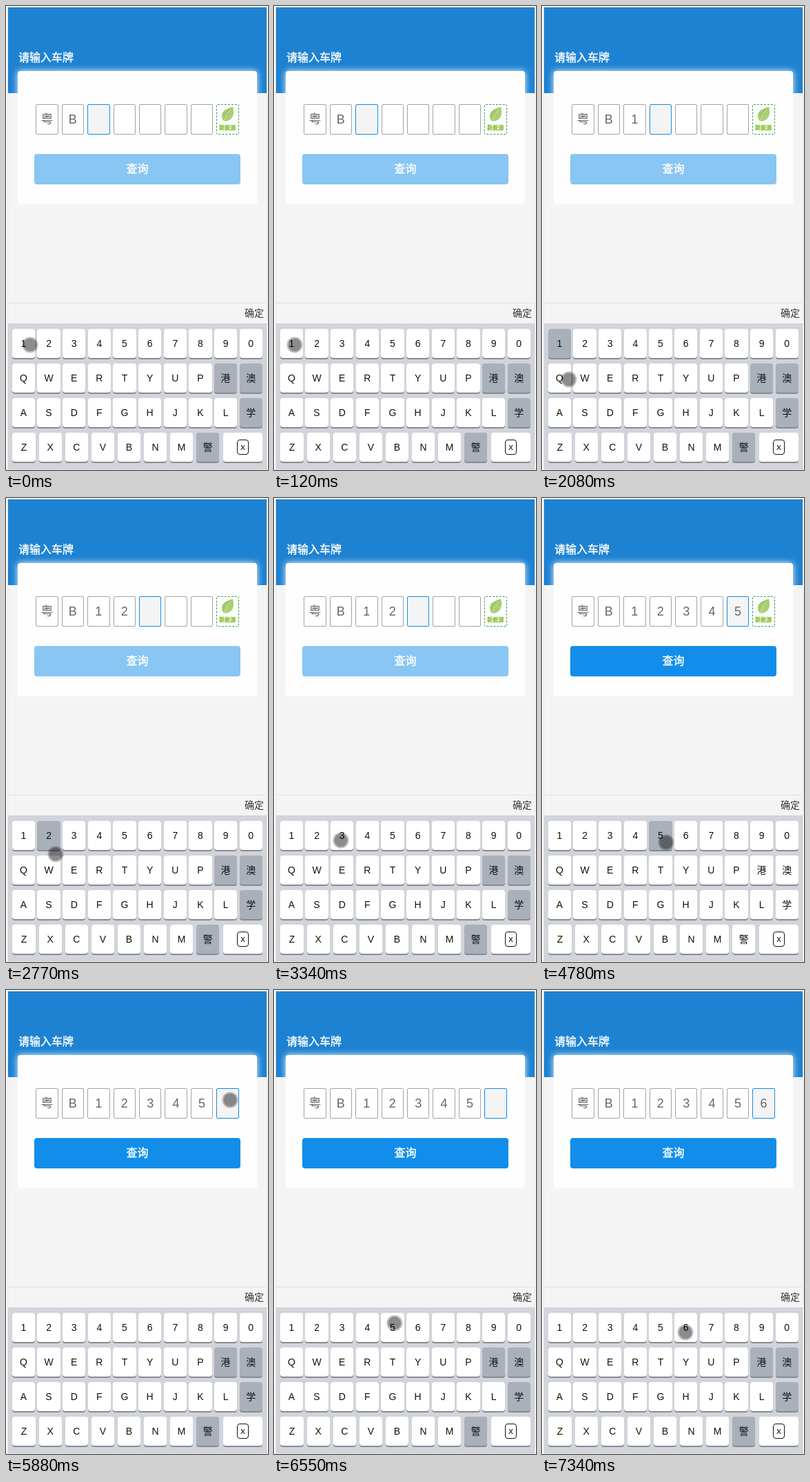
An HTML page that plays this animation: 380 px wide and 671 px high, repeating every 8000 ms.

```html
<!DOCTYPE html>
<html lang="zh-CN">
<head>
<meta charset="utf-8">
<title>请输入车牌</title>
<style>
html, body { margin: 0; width: 100%; height: 100%; overflow: hidden; background: #fff; }
body { font-family: "Liberation Sans", Arial, "Noto Sans CJK SC", "Noto Sans CJK", sans-serif; }
#stage { position: relative; width: 380px; height: 671px; overflow: hidden; }
#stage div, #stage svg { position: absolute; box-sizing: border-box; white-space: nowrap; }
.page { left: 2px; top: 1px; width: 377px; height: 670px; background: #f4f4f4; border: 1px solid #e3e3e3; }
.head { left: 3px; top: 2px; width: 375px; height: 124px; background: #1e82d2; }
.title, .go { font-size: 16px; font-weight: 500; color: #fff; -webkit-text-stroke: .4px #fff; }
.title { left: 18px; top: 63px; line-height: 24px; }
.card { left: 17px; top: 94px; width: 347px; height: 192px; border-radius: 4px; background: #fefefe; box-shadow: 0 0 10px #f4f9fd; }
.cell { top: 142px; width: 32.4px; height: 44px; line-height: 42px; border: 1px solid #a3a3a3; border-radius: 2px; text-align: center; font-size: 18px; color: #666; background: #fff; }
.cell.green { border: 1px dashed #36a04c; }
.cell.on { border: 1px solid #118de9; background: #f4f4f4; }
.go { left: 41px; top: 214px; width: 299px; height: 44px; line-height: 43px; border-radius: 4px; text-align: center; background: #89c6f3; }
.go.on { background: #128eea; }
.bar { left: 3px; top: 429px; width: 375px; height: 30px; padding-right: 4px; line-height: 29px; border-top: 1px solid #e4e4e4; text-align: right; font-size: 14px; color: #333; }
.board { left: 3px; top: 459px; width: 375px; height: 211px; background: #d1d4da; }
.key { height: 42px; line-height: 42px; border-radius: 4px; text-align: center; font-size: 14px; color: #111; background: #fff; box-shadow: 0 2px 0 #898b8f; }
.key.dim { background: #a9b0ba; box-shadow: 0 2px 0 #868b92; }
.del { left: 335px; top: 627px; width: 17px; height: 22px; line-height: 19px; border: 1px solid #111; border-radius: 4px; text-align: center; font-size: 13px; color: #111; }
#leaf { left: 305px; top: 142px; }
#dot { left: -11.5px; top: -11.5px; width: 23px; height: 23px; border: 2.5px solid rgba(0,0,0,.25); border-radius: 50%; background: rgba(0,0,0,.45); background-clip: padding-box; }
</style>
</head>
<body>
<div id="stage">
  <div class="page"></div>
  <div class="head"></div>
  <div class="card"></div>
  <div class="title">请输入车牌</div>
  <div class="go">查询</div>
  <div class="bar">确定</div>
  <div class="board"></div>
</div>
<script>
const stage = document.getElementById('stage');
const LOOP = 8000, STEP = 130, HOLD = 145;
const PLATE = '粤B123456', LOCKED = '港澳学警';
const PRESSES = [2080, 2770, 3460, 4040, 4780, 7190];
const LAST_CELL = 5880;

// pointer moves: start time, x, y, number of visible steps
const MOVES = [
  [0, 34.5, 489.5], [120, 29.5, 489.5],
  [2080, 38.5, 539.5], [2200, 56.5, 551.5], [2350, 62.5, 495.5, 3],
  [2770, 71.5, 514.5], [2920, 91.5, 540.5], [3040, 96.5, 494.5, 3],
  [3610, 144.5, 494.5, 4],
  [4200, 165.5, 509.5], [4350, 179.5, 497.5],
  [5210, 318.5, 287.5, 2], [5490, 324.5, 158.5, 2],
  [6040, 307.5, 355.5], [6190, 165.5, 489.5, 4], [6670, 207.5, 494.5, 3]
];

function pointer(t) {
  const i = MOVES.findLastIndex(m => m[0] <= t);
  const [start, x, y, steps = 1] = MOVES[i];
  const [, fromX, fromY] = MOVES[Math.max(0, i - 1)];
  const p = Math.min(1, (Math.floor((t - start) / STEP) + 1) / steps);
  const rest = (1 - p) ** 2;
  return [x + (fromX - x) * rest, y + (fromY - y) * rest];
}

function add(cls, text = '', css = {}) {
  const el = document.createElement('div');
  el.className = cls;
  el.textContent = text;
  Object.assign(el.style, css);
  return stage.appendChild(el);
}

const cells = Array.from(PLATE, (c, i) => add('cell', '', { left: 43.25 + i * 37.43 + 'px' }));

stage.insertAdjacentHTML('beforeend', `
<svg id="leaf" width="33" height="44">
  <defs><linearGradient id="g" x1="0" y1="0" x2="1" y2="1">
    <stop stop-color="#97c45a"/><stop offset="1" stop-color="#b4d580"/>
  </linearGradient></defs>
  <path d="M24 4C26 11 26 20 18 23.5C14 25.5 10.5 25 9.5 22.5C6 14 9 8 24 4Z" fill="url(#g)"/>
  <path d="M21 8Q14 15 11 26" fill="none" stroke="#dbeabf" stroke-width=".8"/>
  <text x="16.2" y="37" text-anchor="middle" font-size="8" font-weight="900" fill="#8dc03c" stroke="#8dc03c" stroke-width=".3">新能源</text>
</svg>`);
const leaf = document.getElementById('leaf');
const go = document.querySelector('.go');

const keys = {};
['1234567890', 'QWERTYUP港澳', 'ASDFGHJKL学', 'ZXCVBNM警'].forEach((row, r) => {
  const [left, pitch, width] = r < 3 ? [8.8, 36.65, 33.2] : [9.4, 38.1, 33.4];
  Array.from(row, (c, i) => {
    keys[c] = add('key', c, { left: left + i * pitch + 'px', top: 467 + r * 50 + 'px', width: width + 'px' });
  });
});
add('key', '', { left: '315px', top: '617px', width: '57px' });
add('del', 'x');
const dot = add('');
dot.id = 'dot';

function draw(t) {
  const count = PRESSES.filter(p => p <= t).length;
  const typed = PLATE.slice(0, count + 2);
  const pressed = t - PRESSES[count - 1] < HOLD ? typed.at(-1) : '';
  const active = t < LAST_CELL ? Math.min(count + 2, 6) : 7;
  cells.forEach((el, i) => {
    el.textContent = typed[i] || '';
    el.classList.toggle('on', i === active);
    el.classList.toggle('green', i === 7 && active < 7);
  });
  leaf.style.display = active < 7 ? '' : 'none';
  go.classList.toggle('on', count >= 5);
  for (const c in keys) {
    keys[c].classList.toggle('dim', c === pressed || (active !== 6 && LOCKED.includes(c)));
  }
  const [x, y] = pointer(t);
  dot.style.transform = `translate(${x}px, ${y}px)`;
}

const start = performance.now();
function tick() {
  draw((performance.now() - start) % LOOP);
  requestAnimationFrame(tick);
}
draw(0);
requestAnimationFrame(tick);
</script>
</body>
</html>
```
